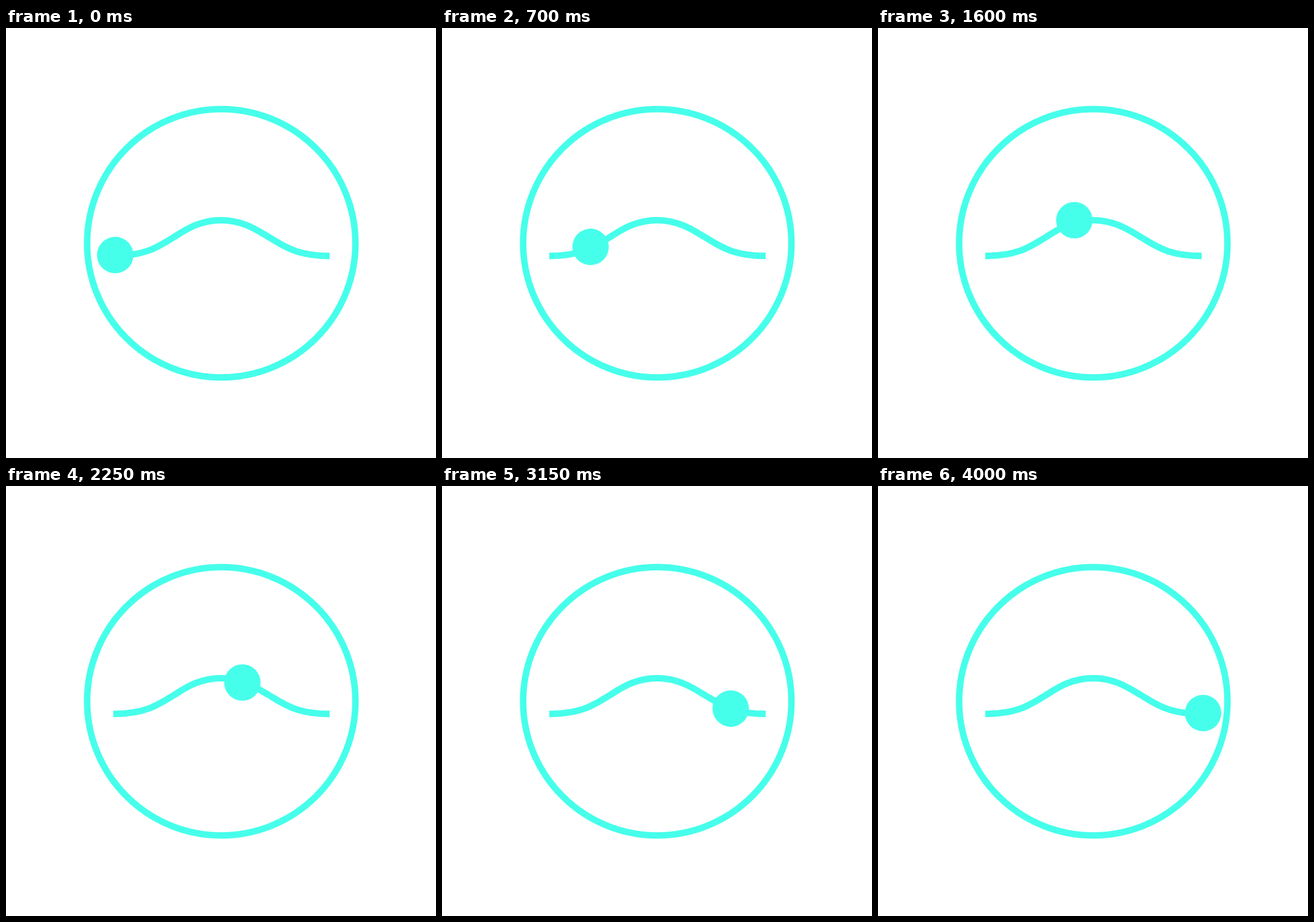
An HTML page for the animation above (4.05 s loop, 748 px wide and 748 px high).

```html
<!DOCTYPE html>
<html lang="en">
<head>
<meta charset="utf-8">
<title>Dot on a wave</title>
<style>
  html, body { margin: 0; height: 100%; overflow: hidden; background: #fff; }
  svg { display: block; width: 100%; height: 100%; }
</style>
</head>
<body>
<svg viewBox="0 0 748 748">
  <defs>
    <path id="track" d="M190 395C235 399 267 377 294.5 359S344 330 368 330
                        S434 352 462 367S516 400 565.5 395"/>
  </defs>
  <g fill="none" stroke="#46ffeb" stroke-width="11.3">
    <circle cx="374.5" cy="374.5" r="233.4"/>
    <path d="M186.5 396.5C245 396.5 267.5 378.5 292.5 363.5C309.5 353 335 334.3 374 334.3
             C414 334.3 440 354 457 363.5C482 378.5 504.5 396.5 563 396.5"/>
  </g>
  <circle id="dot" r="31.7" fill="#46ffeb"/>
</svg>
<script>
const LOOP = 4050, STEP = 50;
const track = document.getElementById('track');
const dot = document.getElementById('dot');
const length = track.getTotalLength();

// Nearly steady travel that comes to rest at the end
const ease = u => 0.98 * u + 0.12 * u ** 2 - 0.1 * u ** 12.2;

const start = performance.now();
function draw() {
  const t = Math.floor((performance.now() - start) % LOOP / STEP) * STEP;
  const { x, y } = track.getPointAtLength(length * ease(t / (LOOP - STEP)));
  dot.setAttribute('cx', x);
  dot.setAttribute('cy', y);
  requestAnimationFrame(draw);
}
draw();
</script>
</body>
</html>
```
